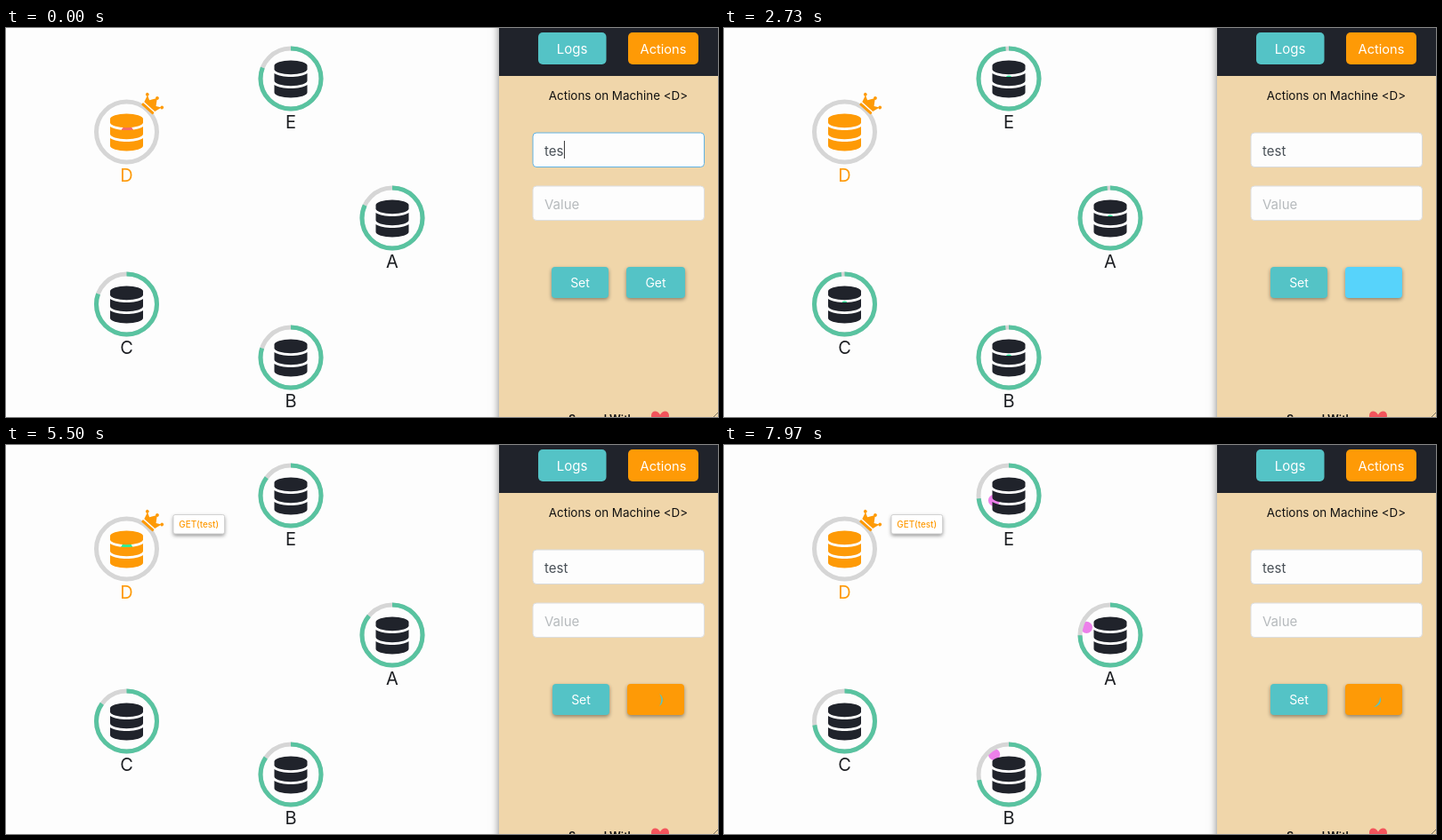
An HTML page with a canvas that plays this animation: 800x438 px, repeating every 8 s.

```html
<!DOCTYPE html>
<html lang="en">
<head>
<meta charset="utf-8">
<title>Cluster view</title>
<style>
  html, body { margin: 0; width: 100%; height: 100%; overflow: hidden; background: #fdfdfd; }
  canvas { display: block; width: 800px; height: 438px; }
</style>
</head>
<body>
<canvas id="stage" width="800" height="438"></canvas>
<script>
const ctx = document.getElementById('stage').getContext('2d');
const LOOP = 8000;
const FONT = 'Inter, "Open Sans", sans-serif';
const TEAL = '#54c3c6', ORANGE = '#fe9a06', SKY = '#57d3fb', DARK = '#20232b';
const GREY = '#d6d6d6', RING = '#59c3a0';

// drain: share of the countdown lost per second
const leader = { name: 'D', x: 135.5, y: 117 };
const followers = [
  { name: 'E', x: 320, y: 57, drain: 0.0475 },
  { name: 'A', x: 434, y: 214, drain: 0.0450 },
  { name: 'C', x: 135.5, y: 311, drain: 0.0485 },
  { name: 'B', x: 320, y: 371, drain: 0.0500 }
];

const TRAVEL = 2650;
const CYCLE = 6400;
const RESET = 2390;
const waves = [
  { color: '#f46a6b', born: -650, start: -280, out: true },
  { color: '#2bf097', born: 2400, start: 3040, out: false },
  { color: '#ec80ea', born: 5690, start: 6067, out: true, lead: 80 }
];

const TYPED = 250, CLICK = 2450, LISTED = 2900;

const clamp = v => Math.max(0, Math.min(1, v));
const ramp = (t, from, length) => clamp((t - from) / length);
const easeInOut = p => p < 0.5 ? 4 * p ** 3 : 1 - 4 * (1 - p) ** 3;

function mix(a, b, p) {
  const part = (hex, i) => parseInt(hex.slice(i, i + 2), 16);
  return `rgb(${[1, 3, 5].map(i => Math.round(part(a, i) + (part(b, i) - part(a, i)) * p))})`;
}

function text(str, x, y, size, color, align = 'center', weight = 400) {
  ctx.font = `${weight} ${size}px ${FONT}`;
  ctx.textAlign = align;
  ctx.fillStyle = color;
  ctx.fillText(str, x, y);
}

function circle(x, y, r, color) {
  ctx.beginPath();
  ctx.arc(x, y, r, 0, 7);
  ctx.fillStyle = color;
  ctx.fill();
}

function arc(x, y, from, to, color) {
  ctx.beginPath();
  ctx.arc(x, y, 34, from, to);
  ctx.lineWidth = 5;
  ctx.strokeStyle = color;
  ctx.stroke();
}

function box(x, y, w, h, r, fill, shadow) {
  ctx.save();
  if (shadow) {
    ctx.shadowColor = `rgba(0,0,0,${shadow})`;
    ctx.shadowBlur = 4;
    ctx.shadowOffsetY = 2;
  }
  ctx.beginPath();
  ctx.roundRect(x, y, w, h, r);
  ctx.fillStyle = fill;
  ctx.fill();
  ctx.restore();
}

function outline(x, y, w, h, r, color) {
  ctx.beginPath();
  ctx.roundRect(x, y, w, h, r);
  ctx.lineWidth = 1;
  ctx.strokeStyle = color;
  ctx.stroke();
}

function database(x, y, color) {
  const w = 18.5, ry = 6;
  ctx.save();
  ctx.translate(x, y - 21);
  ctx.fillStyle = color;
  ctx.beginPath();
  ctx.ellipse(0, 6, w, ry, 0, Math.PI, 0);
  ctx.ellipse(0, 9.8, w, ry, 0, 0, Math.PI);
  ctx.fill();
  for (const top of [14.4, 27.6]) {
    ctx.beginPath();
    ctx.moveTo(-w, top);
    ctx.bezierCurveTo(-14.5, top + 2.7, -7.3, top + 4, 0, top + 4);
    ctx.bezierCurveTo(7.3, top + 4, 14.5, top + 2.7, w, top);
    ctx.ellipse(0, top + 8.4, w, ry, 0, 0, Math.PI);
    ctx.fill();
  }
  ctx.restore();
}

function crown(x, y) {
  ctx.save();
  ctx.translate(x, y);
  ctx.rotate(0.73);
  box(-8.5, 6.3, 17, 3, 0.8, ORANGE);
  ctx.beginPath();
  [[-8, 4.8], [-10.5, -3.5], [-5, -0.5], [0, -8], [5, -0.5], [10.5, -3.5], [8, 4.8]]
    .forEach(p => ctx.lineTo(...p));
  ctx.fill();
  for (const [bx, by] of [[-11, -3.8], [0, -8.2], [11, -3.8]]) circle(bx, by, 1.9, ORANGE);
  ctx.restore();
}

function messages(t) {
  for (const wave of waves) {
    for (const node of followers) {
      const start = wave.start - (node.name === 'C' ? wave.lead || 0 : 0);
      if (t < wave.born || t >= start + TRAVEL) continue;
      const [a, b] = wave.out ? [leader, node] : [node, leader];
      const p = easeInOut(ramp(t, start, TRAVEL));
      const r = 6.6 * ramp(t, wave.born, start - wave.born);
      circle(a.x + (b.x - a.x) * p, a.y + (b.y - a.y) * p, r, wave.color);
    }
  }
}

function nodes(t) {
  const top = -Math.PI / 2;
  const age = (t < RESET ? t - RESET + CYCLE : t - RESET) / 1000;
  for (const n of followers) {
    const end = top + 2 * Math.PI * (1 - age * n.drain);
    arc(n.x, n.y, 0, 2 * Math.PI, GREY);
    arc(n.x, n.y, top, end, RING);
    database(n.x, n.y + 0.5, DARK);
    text(n.name, n.x, n.y + 56, 20, '#1c1e22');
  }
  arc(leader.x, leader.y, 0, 2 * Math.PI, GREY);
  database(leader.x, leader.y + 0.5, ORANGE);
  text(leader.name, leader.x, leader.y + 56, 20, ORANGE);
  crown(164.5, 85);
  if (t >= LISTED) {
    box(188, 78.5, 57.5, 21.5, 2, '#ffffff', 0.45);
    outline(188, 78.5, 57.5, 21.5, 2, '#d2d2d2');
    text('GET(test)', 216.7, 92.6, 9.9, ORANGE, 'center', 500);
  }
}

function spinner(x, y, t) {
  ctx.save();
  ctx.translate(x, y);
  ctx.rotate(Math.PI + (t - 3500) / 800 * 2 * Math.PI);
  ctx.beginPath();
  ctx.arc(0, 0, 8, -1, 1);
  ctx.quadraticCurveTo(8.2, 0, 4.3, -6.7);
  ctx.fillStyle = TEAL;
  ctx.fill();
  ctx.restore();
}

function heart(x, y) {
  ctx.beginPath();
  ctx.moveTo(x, y + 3);
  ctx.bezierCurveTo(x - 3, y - 3, x - 10, y - 2, x - 10, y + 4);
  ctx.bezierCurveTo(x - 10, y + 9, x - 4, y + 13, x, y + 17);
  ctx.bezierCurveTo(x + 4, y + 13, x + 10, y + 9, x + 10, y + 4);
  ctx.bezierCurveTo(x + 10, y - 2, x + 3, y - 3, x, y + 3);
  ctx.fillStyle = '#f3545c';
  ctx.fill();
}

function fields(t) {
  const focused = t < CLICK;
  const value = t < TYPED ? 'tes' : 'test';
  box(592, 118, 192.5, 38.5, 4, '#fdfdfd');
  outline(592, 118, 192.5, 38.5, 4, focused ? '#62b3e2' : '#d8dadc');
  text(value, 605, 143.5, 15, '#495057', 'left');
  const blink = t < TYPED ? 0 : (t - TYPED) % 1000;
  if (focused && blink < 500) {
    ctx.fillStyle = '#333';
    ctx.fillRect(605.5 + ctx.measureText(value).width, 127, 1, 20);
  }
  box(592, 178, 192.5, 38.5, 4, '#fdfdfd');
  outline(592, 178, 192.5, 38.5, 4, '#dcdee0');
  text('Value', 605, 203.5, 15, '#b6babd', 'left');
}

function buttons(t) {
  const loading = t >= CLICK;
  const shift = loading ? 1 : 0;
  box(613 + shift, 269, 64, 35, 4, TEAL, 0.4);
  text('Set', 645 + shift, 292, 14, '#fff');
  const fill = t < 2950
    ? mix(TEAL, SKY, ramp(t, 950, 200))
    : mix(SKY, ORANGE, ramp(t, 2950, 200));
  box(697 + shift, 269, loading ? 64 : 66, 35, 4, fill, 0.4);
  if (loading) {
    if (t >= 2950) spinner(730, 287, t);
  } else {
    text('Get', 730, 292, 14, '#fff');
  }
}

function panel(t) {
  ctx.save();
  ctx.shadowColor = 'rgba(0,0,0,0.5)';
  ctx.shadowBlur = 9;
  ctx.fillStyle = '#f0d6aa';
  ctx.fillRect(554, -10, 260, 460);
  ctx.restore();
  ctx.fillStyle = DARK;
  ctx.fillRect(554, 0, 246, 54);
  box(598, 5, 76.5, 36, 5, TEAL);
  box(699, 5, 79, 36, 5, ORANGE);
  text('Logs', 636, 29, 15, '#fff');
  text('Actions', 738.5, 29, 14.6, '#fff');
  text('Actions on Machine <D>', 688, 81, 13.4, '#111');
  fields(t);
  buttons(t);
  text('Served With', 632, 444.5, 12.5, '#111', 'left', 600);
  heart(735, 432.5);
  ctx.beginPath();
  ctx.moveTo(794, 439);
  ctx.lineTo(800, 433);
  ctx.lineWidth = 1;
  ctx.strokeStyle = '#77705f';
  ctx.stroke();
}

function draw() {
  const t = performance.now() % LOOP;
  ctx.fillStyle = '#fdfdfd';
  ctx.fillRect(0, 0, 800, 438);
  messages(t);
  nodes(t);
  panel(t);
  requestAnimationFrame(draw);
}
draw();
</script>
</body>
</html>
```
